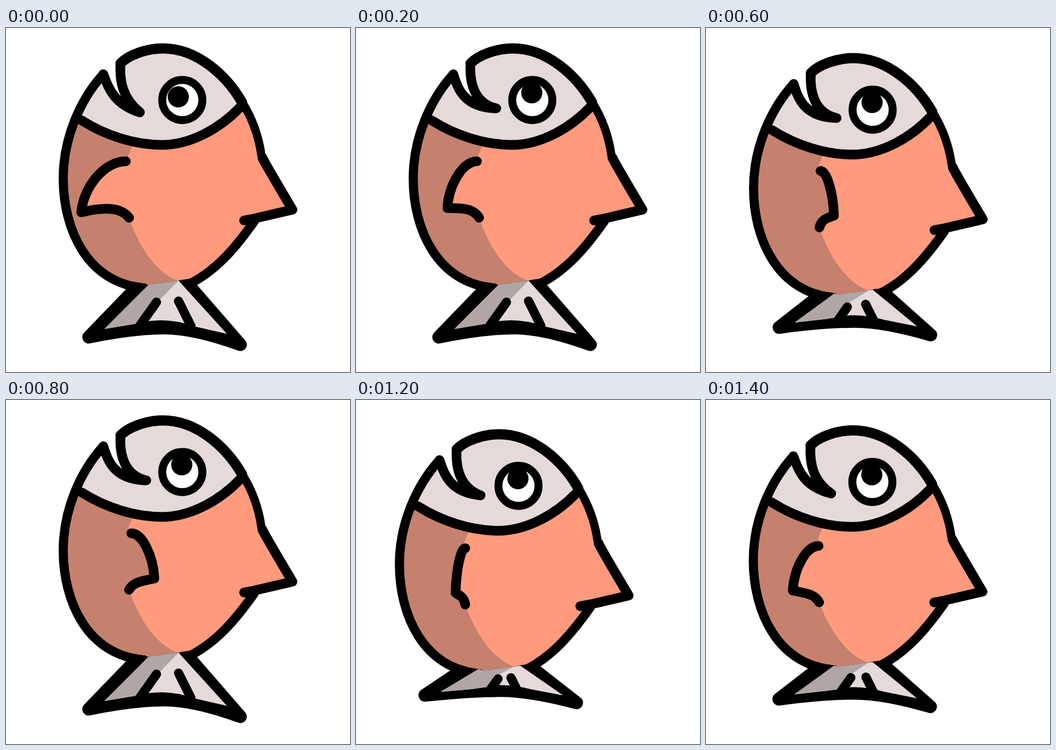
Recreate the animation shown at these times as an HTML page. Size 640 px wide and 640 px high, loop 1.6 s.

```html
<!DOCTYPE html>
<html lang="en">
<head>
<meta charset="utf-8">
<title>Fish head</title>
<style>
  html, body { margin: 0; width: 100%; height: 100%; overflow: hidden; background: #fff; }
  svg { display: block; width: 100%; height: 100%; }
  .ink { fill: none; stroke: #000; stroke-width: 18; stroke-linecap: round; stroke-linejoin: round; }
  .side { stroke-width: 17; stroke-linecap: butt; }
</style>
</head>
<body>
<svg viewBox="0 0 640 640">
  <defs>
    <clipPath id="below">
      <path d="M0,400 L120,400 L150,428 L190,457 L235,472 L254,475 L265,478 L321,470 L331,468 L345,466 L400,435 L640,400 V700 H0 Z"/>
    </clipPath>
    <clipPath id="torso">
      <path id="torsoShape" d="M127,172 C111,208 106.500,243 106.500,280 C106.500,373 150,476 260,484 L265,478 L321,470 L335,477 C390,455 430,405 463,358 L533,338 L478,243 C471,205 460,172 439,140 C400,185 345,217 290,217 C240,217 185,200 141,172 Z"/>
    </clipPath>
  </defs>
  <g id="fish">
    <use href="#torsoShape" fill="#ff9a7d"/>
    <path id="shade" fill="#c5816d" clip-path="url(#torso)"/>
    <path id="head" fill="#e5dada"/>

    <path class="ink side" d="M181,86 C138,133 106.500,205 106.500,280 C106.500,373 150,476 260,484"/>
    <path class="ink side" d="M463,358 C430,405 390,455 333,480"/>
    <path class="ink" style="stroke-width:19" d="M213,66 C228,50 262,38 292,38 C354,38 409,86 439,138"/>
    <path class="ink" style="stroke-width:15.500" d="M440,139 C461,173 471,207 475,236 Q476,242 479,247"/>
    <path class="ink" d="M477,241 Q480,249 533,338 L462,354.500 L443,358"/>
    <path class="ink" d="M141,172 C185,200 240,217.500 290,217.500 C345,217.500 400,185 436,147"/>
    <path id="mouth" class="ink"/>

    <g clip-path="url(#below)">
      <path id="tailInk" class="ink" style="fill:#000;stroke-width:24"/>
      <path id="tailFill" fill="#e5dada"/>
      <path id="tailShade" fill="#afa6a5"/>
      <path id="rays" class="ink" style="stroke-width:17"/>
    </g>

    <path id="fin" class="ink"/>
    <circle cx="328" cy="134" r="34" fill="#fff"/>
    <circle id="pupil" r="19.700"/>
    <circle class="ink" cx="328" cy="134" r="37.300" style="stroke-width:14.800"/>
  </g>
</svg>
<script>
const STEP = 200;

// sink: squash depth, droop: mouth corner, fin: start, tip and lower-edge bend, rays: upper ends
const poses = [
  { sink: 0,    droop: 1,   fin: [223, 248, 140, 343, -10], rays: [280, 510, 321, 508] },
  { sink: 0,    droop: 0,   fin: [225, 248, 170, 335, 0],   rays: [280, 510, 321, 508] },
  { sink: 25,   droop: 0,   fin: [227, 248, 199, 331, 6],   rays: [292, 493, 313, 490] },
  { sink: 18,   droop: 0,   fin: [231, 248, 256, 331, 5],   rays: [281, 501, 315, 496] },
  { sink: 0,    droop: 0,   fin: [233, 248, 276, 332, 5],   rays: [280, 510, 321, 508] },
  { sink: 13,   droop: 0,   fin: [230, 248, 242, 332, 5],   rays: [281, 512, 321, 508] },
  { sink: 25.7, droop: 0.3, fin: [229, 250, 211, 333, 6],   rays: [290, 493, 314, 491] },
  { sink: 18.5, droop: 0.8, fin: [228, 253, 180, 336, 5],   rays: [288, 498, 316, 497] }
];

const el = id => document.getElementById(id);
const setPath = (id, d) => el(id).setAttribute("d", d);
const mix = (a, b, t) => a + (b - a) * t;

function drawMouth(droop) {
  const pt = (x0, y0, x1, y1) => `${mix(x0, x1, droop)},${mix(y0, y1, droop)}`;
  const end = pt(261, 149.5, 249, 157);
  const low = `C${pt(190, 115, 191, 112)} ${pt(202, 148, 200, 141)} ${end}`;
  const up = `C${pt(219, 140, 217, 130)} 211,100 213,66`;
  setPath("mouth", `M181,86 ${low} ${up}`);
  setPath("head", `M181,86 ${low} ${up} C228,50 262,38 292,38 C354,38 409,86 439,138 L436,147
    C400,185 345,217 290,217 C240,217 185,200 141,172 L127,172 C138,140 154,112 181,86 Z`);
}

function drawFin([sx, sy, tx, ty, bend]) {
  const ex = 229, ey = sy + 105;
  const curve = `C${mix(sx, tx, 0.48)},${sy} ${mix(sx, tx, 0.95)},${mix(sy, ty, 0.5)} ${tx},${ty}
    C${mix(tx, ex, 0.45)},${ty + bend} ${mix(tx, ex, 0.82)},${ty + bend * 1.1} ${ex},${ey}`;
  setPath("fin", `M${sx},${sy} ${curve}`);
  setPath("shade", `M80,160 L160,170 L240,205 L234,222 L227,239 L${sx},${sy} ${curve}
    C245,400 275,455 322,471 L265,478 L240,500 L80,500 Z`);
}

function drawTail(d, [lx, ly, rx, ry]) {
  const mid = 558 - 1.68 * d;
  setPath("tailInk", `M296,428 L154,${575 - 2 * d} Q235,${mid} 295,${mid} Q350,${mid} 436,${589 - 2 * d} Z`);

  // the body uncovers more of the tail's upper edge as it sinks
  const topLeft = `${265 - 0.44 * d},${478 - 0.12 * d}`;
  const topRight = `${321 + 0.4 * d},${470 - 0.06 * d}`;
  const left = `183,${560 - 1.66 * d}`;
  const dip = `243,${550 - 1.48 * d}`;
  setPath("tailFill", `M${topLeft} L265,478 L321,470 L${topRight} L411,${569 - 1.76 * d}
    L350,${555 - 1.66 * d} Q295,${535.5 - 1.48 * d} ${dip} L${left} Z`);

  const base = 554 - 1.65 * d;
  const lb = lx - (base - ly) * 0.71;
  const rb = rx + (base - ry) * 0.5;
  setPath("tailShade", `M${topLeft} L265,478 L321,470 L${lx + 6 - 0.5 * d},${ly - 4}
    L${lb},${base - 4} L${dip} L${left} Z`);
  setPath("rays", `M${lx},${ly} L${lb},${base} M${rx},${ry} L${rb},${base}`);
}

let shown = -1;

function draw(ms) {
  const i = Math.floor(ms / STEP) % poses.length;
  if (i === shown) return;
  shown = i;
  const { sink, droop, fin, rays } = poses[i];
  el("fish").setAttribute("transform", `translate(${-sink} ${sink})`);
  el("pupil").setAttribute("cx", i ? 327 : 320.5);
  el("pupil").setAttribute("cy", i ? 120.5 : 128);
  drawMouth(droop);
  drawFin(fin);
  drawTail(sink, rays);
}

const start = performance.now();
function tick() {
  draw(performance.now() - start);
  requestAnimationFrame(tick);
}
tick();
</script>
</body>
</html>
```
